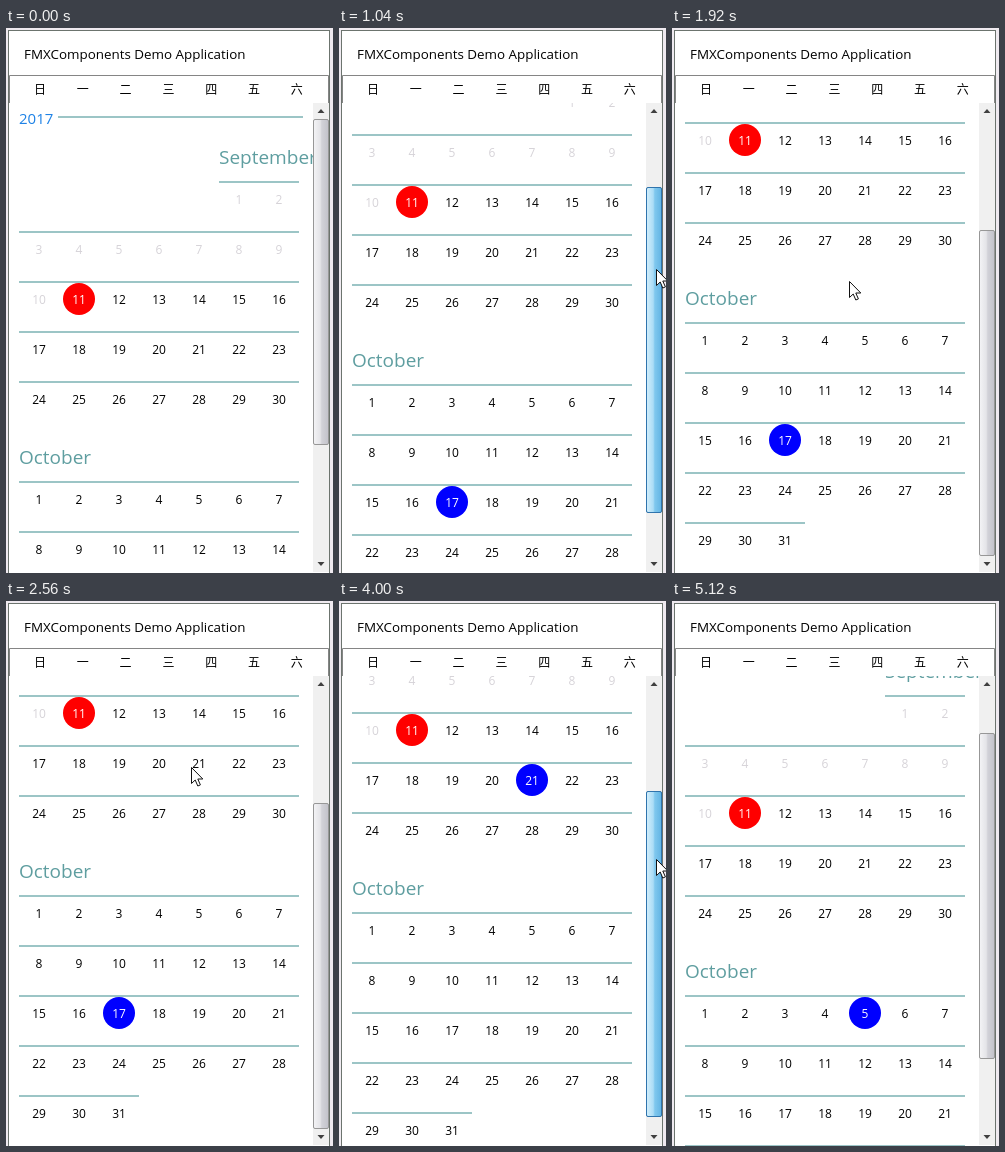
These frames come from a looping animation (327x545 px, 5920 ms). An HTML page:

```html
<!DOCTYPE html>
<html lang="en">
<head>
<meta charset="utf-8">
<title>Calendar demo</title>
<style>
html, body { margin: 0; width: 100%; height: 100%; overflow: hidden; background: #fff; }
svg { display: block; font-family: "Open Sans", "Noto Sans", sans-serif; }
.week { font: 12px "Noto Sans CJK SC", "Noto Sans CJK JP", "Noto Sans CJK", sans-serif; text-anchor: middle; }
.day { font-size: 12px; text-anchor: middle; }
.month { font-size: 19px; fill: #5f9ea0; }
.rule { fill: #9cc5c6; }
</style>
</head>
<body>
<svg id="stage" width="327" height="545" viewBox="0 0 327 545">
  <defs>
    <clipPath id="view"><rect x="3" y="75" width="304" height="470"/></clipPath>
    <linearGradient id="idle">
      <stop offset="0" stop-color="#f4f4f6"/><stop offset=".45" stop-color="#e4e4e8"/>
      <stop offset=".55" stop-color="#d2d2d8"/><stop offset="1" stop-color="#c2c2ca"/>
    </linearGradient>
    <linearGradient id="hot">
      <stop offset="0" stop-color="#d4effc"/><stop offset=".45" stop-color="#aadcf6"/>
      <stop offset=".55" stop-color="#80c8ee"/><stop offset="1" stop-color="#62b4e4"/>
    </linearGradient>
  </defs>
  <rect width="327" height="545" fill="#efeaf0"/>
  <rect x="2.5" y="2.5" width="321" height="550" fill="#fff" stroke="#6c746e"/>
  <text x="18" y="31" font-size="13.4">FMXComponents Demo Application</text>
  <path d="M3.5 75V47.5H322.5V75" fill="none" stroke="#858585"/>
  <g id="week" class="week"></g>
  <g clip-path="url(#view)"><g id="page"></g></g>
  <rect x="307" y="75" width="16" height="469" fill="#f0f0f0"/>
  <path d="M311.5 85l3.5-4 3.5 4zM311.5 534l3.5 4 3.5-4z" fill="#404040"/>
  <g id="thumb">
    <rect x="307.5" y=".5" width="15" height="325" rx="1.5" fill="url(#idle)" stroke="#979797"/>
    <rect id="glow" x="307.5" y=".5" width="15" height="325" rx="1.5" fill="url(#hot)" stroke="#2f74ad"/>
  </g>
  <path id="cursor" d="M.5 .5V16.5L4.2 13 6.8 19 9.4 17.9 6.8 12H11.8Z" fill="#fff" stroke="#111"/>
</svg>
<script>
const LOOP = 5920, STEP = 80;
const MAX_SCROLL = 159, THUMB_RATIO = 0.7;
const $ = id => document.getElementById(id);
const clamp = (v, lo, hi) => Math.min(hi, Math.max(lo, v));
const ease = f => (1 - Math.cos(Math.PI * f)) / 2;

function add(parent, tag, attrs, text) {
  const el = document.createElementNS("http://www.w3.org/2000/svg", tag);
  for (const k in attrs) el.setAttribute(k, attrs[k]);
  if (text !== undefined) el.textContent = text;
  return parent.appendChild(el);
}

const page = $("page");
const rule = (x1, x2, y) => add(page, "rect", { class: "rule", x: x1, y: y - 1, width: x2 - x1, height: 2 });
const colX = col => 33 + 40 * col;

[..."日一二三四五六"].forEach((c, i) => add($("week"), "text", { x: 34 + 42.8 * i, y: 66 }, c));

const labels = {};
let picked;

// Builds one month; "top" is the rule above its first week.
function month(name, key, top, first, count, ink) {
  add(page, "text", { class: "month", x: colX(first) - 20, y: top - 18 }, name);
  for (let d = 1; d <= count; d++) {
    const slot = first + d - 1, col = slot % 7, y = top + 50 * Math.floor(slot / 7);
    if (d === 1 || col === 0) {
      const last = Math.min(6, col + count - d);
      rule(colX(col) - 20, colX(last) + 20, y);
    }
    labels[key + d] = { day: d, x: colX(col), y: y + 17, ink: ink(d) };
  }
}

add(page, "text", { x: 13, y: 96, "font-size": 15, fill: "#1e82e6" }, "2017");
rule(52, 297, 89);
month("September", "s", 154, 5, 30, d => d < 11 ? "#d6d3d8" : d === 11 ? "#fff" : "#000");
month("October", "o", 454, 0, 31, () => "#000");
add(page, "circle", { cx: labels.s11.x, cy: labels.s11.y, r: 16, fill: "#f00" });
const dot = add(page, "circle", { r: 16, fill: "#00f" });
for (const k in labels) {
  const l = labels[k];
  l.el = add(page, "text", { class: "day", x: l.x, y: l.y + 5, fill: l.ink }, l.day);
}

function pick(key) {
  if (key === picked) return;
  if (picked) labels[picked].el.setAttribute("fill", labels[picked].ink);
  const l = labels[picked = key];
  l.el.setAttribute("fill", "#fff");
  dot.setAttribute("cx", l.x);
  dot.setAttribute("cy", l.y);
}

// Pointer moves: start time, end time, destination.
const moves = [
  [400, 560, 318, 173],
  [720, 1360, 315, 309],
  [1520, 1920, 177, 253],
  [1920, 2160, 68, 198],
  [2160, 2240, 180, 197],
  [2400, 2640, 187, 156],
  [2880, 3200, 242, 209],
  [3200, 3600, 318, 270],
  [3760, 4000, 317, 258],
  [4000, 4160, 317, 200],
  [4160, 4400, 186, 424],
  [4800, 5040, 256, 448]
];

function pointer(t) {
  let x = 323, y = 140;
  for (const [from, to, tx, ty] of moves) {
    const f = ease(clamp((t - from) / (to - from), 0, 1));
    x += (tx - x) * f;
    y += (ty - y) * f;
  }
  return { x: Math.round(x), y: Math.round(y) };
}

// The page follows the pointer during the drag down and the drag back up.
function scrollAt(t) {
  const down = (pointer(clamp(t, 720, 1360)).y - 173) / THUMB_RATIO;
  const up = (pointer(clamp(t, 3760, 4160)).y - 270) / THUMB_RATIO;
  return Math.round(Math.min(down, MAX_SCROLL) + up);
}

function draw(ms) {
  const t = Math.floor((ms % LOOP) / STEP) * STEP;
  const { x, y } = pointer(t), scroll = scrollAt(t);
  const shown = t >= 400 && t < 5120;
  pick(t < 2960 ? "o17" : t < 4720 ? "s21" : "o5");
  page.setAttribute("transform", `translate(0 ${-scroll})`);
  $("thumb").setAttribute("transform", `translate(0 ${91 + Math.round(scroll * THUMB_RATIO)})`);
  $("glow").setAttribute("opacity", shown ? clamp((x - 295) / 15, 0, 1) : 0);
  $("cursor").setAttribute("transform", `translate(${x} ${y})`);
  $("cursor").setAttribute("visibility", shown ? "visible" : "hidden");
}

let start;
function tick(now) {
  if (start === undefined) start = now;
  draw(now - start);
  requestAnimationFrame(tick);
}
draw(0);
requestAnimationFrame(tick);
</script>
</body>
</html>
```
